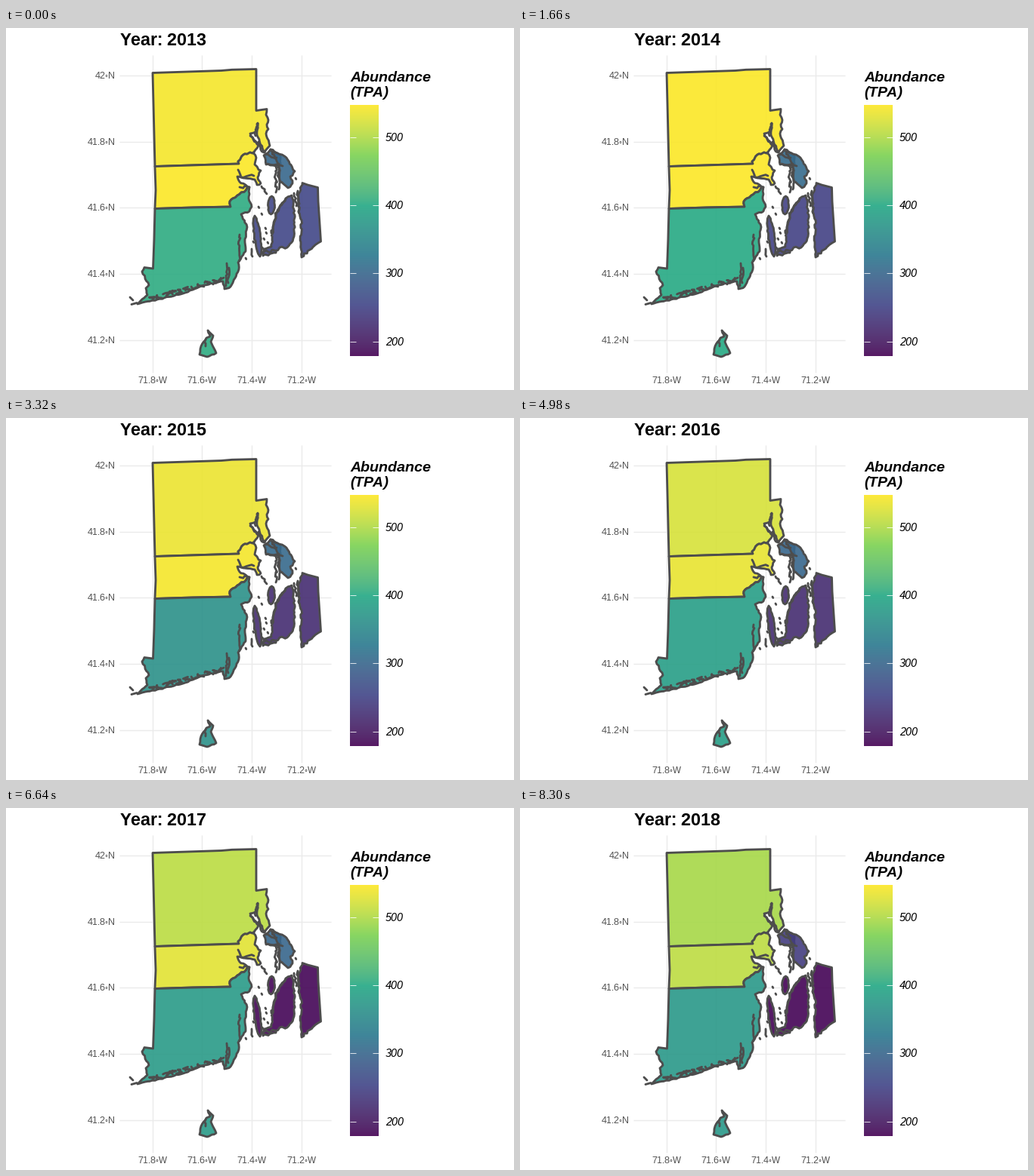
A matplotlib script for the animation above (9960 ms loop, 672 by 480 pixels).

```python
import random

import matplotlib.pyplot as plt
import numpy as np
from matplotlib.animation import FuncAnimation
from matplotlib.patches import Polygon

W, H, DPI = 672, 480, 96
PX = 72 / DPI
INK = "#4d4d4d"
ALPHA = 0.9
STROKE = 2.85 * PX
rng = random.Random(11)

plt.rcParams.update({
    "font.family": ["Liberation Sans", "DejaVu Sans"],
    "text.hinting": "default",
    "text.hinting_factor": 1,
})

# --- colour scale: six viridis stops blended in CIE Lab ---------------------
STOPS = "440154 414487 2A788E 22A884 7AD151 FDE725".split()
XYZ = np.array([[0.4124, 0.3576, 0.1805],
                [0.2126, 0.7152, 0.0722],
                [0.0193, 0.1192, 0.9505]])
WHITE = XYZ.sum(axis=1)
OPP = np.array([[0, 116, 0], [500, -500, 0], [0, 200, -200]])


def to_lab(code):
    c = np.array([int(code[i:i + 2], 16) for i in (0, 2, 4)]) / 255
    lin = np.where(c > 0.04045, ((c + 0.055) / 1.055) ** 2.4, c / 12.92)
    t = XYZ @ lin / WHITE
    return OPP @ np.where(t > 0.008856, np.cbrt(t), 7.787 * t + 16 / 116)


def to_rgb(lab):
    f = np.linalg.solve(OPP, lab)
    t = np.where(f > 0.2069, f ** 3, (f - 16 / 116) / 7.787)
    lin = np.clip(np.linalg.solve(XYZ, t * WHITE), 0, 1)
    c = np.where(lin > 0.0031308, 1.055 * lin ** (1 / 2.4) - 0.055, 12.92 * lin)
    return np.clip(c, 0, 1)


LABS = np.array([to_lab(s) for s in STOPS])


def shade(t):
    pos = np.linspace(0, 1, len(STOPS))
    return to_rgb(np.array([np.interp(t, pos, LABS[:, k]) for k in range(3)]))


# --- map geometry -----------------------------------------------------------
def rough(pts, amp=1.0, step=3.2):
    """Subdivide a line and shake the inner points like a coast."""
    out = [pts[0]]
    for (x0, y0), (x1, y1) in zip(pts, pts[1:]):
        n = max(1, round(np.hypot(x1 - x0, y1 - y0) / step))
        for i in range(1, n + 1):
            a = amp if i < n else 0
            out.append((x0 + (x1 - x0) * i / n + rng.uniform(-a, a),
                        y0 + (y1 - y0) * i / n + rng.uniform(-a, a)))
    return out


def island(x, y, rx, ry, lean):
    """A ragged ellipse whose top leans sideways."""
    a = np.linspace(0, 2 * np.pi, 13)
    top = -np.sin(a)
    return rough(list(zip(x + rx * np.cos(a) - lean * top, y + ry * top)), 0.7)


north_edge = [(197, 183.5), (308, 180)]
north_bay = rough([(308, 180), (307, 177), (314, 168), (328, 164.5)])
south_edge = [(197, 239.5), (246, 238), (297, 237)]
south_bay = rough([(297, 237), (296, 230), (306, 222), (322, 211)])

providence = (
    [(194, 59.5), (285, 56.5), (299, 55.3), (331, 54.5), (331, 109.5)]
    + rough([(345, 107.5), (344, 115), (347, 122), (345, 128), (347, 134), (344, 140),
             (349, 156), (342, 165), (332, 142), (333, 126), (330, 138), (323, 140),
             (334, 156), (328, 164.5)], 0.7)
    + north_bay[::-1] + north_edge[::-1] + [(195, 100)])

kent = (
    north_edge + north_bay
    + rough([(328, 164.5), (331, 172), (329, 181), (337, 189), (333, 198), (337, 206),
             (332, 208), (329, 201), (306, 197), (309, 204), (322, 211)])
    + south_bay[::-1] + south_edge[::-1] + [(198, 215)])

washington = (
    south_edge + south_bay
    + rough([(322, 211), (321, 226), (325, 237), (322, 243), (311, 247), (319, 264),
             (316, 284), (317, 296), (307, 311), (308, 320), (297, 343), (289, 346),
             (287, 336), (262, 341), (231, 353), (200, 360), (174, 366), (187, 354),
             (185, 345), (189, 341), (180, 323), (183, 317.5)], 0.7)
    + [(194.5, 319), (196, 280)])

block_island = rough([(267, 401), (274, 408), (271, 416), (278, 431), (266, 436),
                      (256, 433), (258, 422), (265, 411), (270, 409), (267, 401)], 0.5)

barrington = rough([(341, 169), (350, 161), (363, 168), (362, 183), (344, 181),
                    (341, 169)])
bristol = rough([(350, 161), (371, 172), (382, 190), (376, 197), (379, 206),
                 (373, 212), (362, 203), (360, 180), (350, 161)])

tiverton = (
    [(392, 205.5), (399, 208), (412.5, 211.5), (413, 230), (416.5, 283)]
    + rough([(416.5, 283), (402, 294), (391, 304), (390, 287), (391, 255), (387, 244),
             (387, 220), (392, 205.5)], 1.3))
aquidneck = rough([(378, 222), (382, 248), (380, 279), (372, 291), (362, 291),
                   (357, 298), (340, 302), (341, 293), (351, 290), (354, 258),
                   (361, 239), (370, 226), (378, 222)], 1.3)
conanicut = island(332.5, 276, 4, 27, -3.5)
prudence = island(351, 235, 4.5, 12, 0.5)

COUNTIES = [
    [providence],
    [kent],
    [washington, block_island],
    [barrington, bristol],
    [tiverton, aquidneck, conanicut, prudence],
]
# Position on the colour scale, one row per county, one column per year.
LEVELS = [
    [0.985, 0.997, 0.97, 0.935, 0.892, 0.86],
    [0.996, 0.999, 0.985, 0.965, 0.955, 0.895],
    [0.613, 0.603, 0.5, 0.56, 0.543, 0.535],
    [0.335, 0.345, 0.34, 0.33, 0.33, 0.175],
    [0.21, 0.19, 0.115, 0.112, 0.008, 0.004],
]

# Narrow inlets, each a ragged stroke between two ends.
INLETS = [
    (323, 143, 332, 152), (332, 127, 330, 143), (334, 151, 341, 165),
    (307, 188, 310, 197), (309, 197, 328, 196), (309, 211, 318, 210),
    (309, 274, 308, 309), (292, 312, 291, 342), (295, 318, 294, 338),
    (264, 413, 264, 422), (344, 168, 358, 172), (346, 180, 366, 183),
    (357, 184, 357, 218), (361, 184, 361, 214), (338, 210, 345, 220),
    (381, 219, 384, 236), (386, 216, 388, 246), (370, 226, 356, 246),
    (357, 247, 351, 272), (341, 297, 356, 295), (325, 293, 326, 303),
]
ISLETS = [(334, 237), (338, 246), (343, 265), (344, 271), (341, 279), (346, 284),
          (339, 291), (327, 283), (317, 305), (383, 199)]

strokes = [rough([(x0, y0), (x1, y1)], 1.8) for x0, y0, x1, y1 in INLETS]
strokes += [[(x, y), (x + 0.8, y + 1.5)] for x, y in ISLETS]
strokes += [[(164, 357), (168, 361)], [(166, 366.5), (173, 364.5)]]
# Salt ponds behind the southern beaches
for x in range(194, 288, 9):
    y = np.interp(x, [190, 231, 288], [359, 348, 333])
    strokes.append([(x + rng.uniform(-5, 5), y + rng.uniform(-3, 4)) for _ in range(5)])

# --- static picture ---------------------------------------------------------
fig = plt.figure(figsize=(W / DPI, H / DPI), dpi=DPI, facecolor="white")
ax = fig.add_axes([0, 0, 1, 1])
ax.axis("off")

grid = dict(color="#ebebeb", lw=1.42 * PX, zorder=1, solid_capstyle="butt")
label = dict(size=8.8, color=INK, va="baseline")
for i in range(5):
    y = 63 + 87.65 * i
    ax.plot([150, 430], [y, y], **grid)
    ax.text(145, y + 4, f"{42 - 0.2 * i:.3g}\u25e6N", ha="right", **label)
for i in range(4):
    x = 193.7 + 65.6 * i
    ax.plot([x, x], [36, 457], **grid)
    ax.text(x, 471, f"{71.8 - 0.2 * i:.3g}\u25e6W", ha="center", **label)

shapes = []
for parts in COUNTIES:
    group = [Polygon(p, closed=True, ec=INK, lw=STROKE, joinstyle="round", zorder=3)
             for p in parts]
    for patch in group:
        ax.add_patch(patch)
    shapes.append(group)
for line in strokes:
    ax.plot(*zip(*line), color=INK, lw=STROKE, solid_capstyle="round",
            solid_joinstyle="round", zorder=4)

# Colour bar
ramp = np.array([[shade(t)] for t in np.linspace(1, 0, 333)])
ax.imshow(ramp * ALPHA + 1 - ALPHA, extent=(455, 492.5, 435.5, 103), aspect="auto",
          interpolation="bilinear", zorder=2)
for value in (200, 300, 400, 500):
    y = 145 + (500 - value) * 0.902
    for x in (455, 485):
        ax.plot([x, x + 7.5], [y, y], color="white", lw=0.8 * PX, zorder=3,
                solid_capstyle="butt")
    ax.text(502, y + 5, str(value), size=11, style="italic", va="baseline")
for y, word in ((71, "Abundance"), (91, "(TPA)")):
    ax.text(455, y, word, size=14, style="italic", weight="bold", va="baseline")

title = ax.text(151, 23, "", size=17, weight="bold", va="baseline")
ax.set_xlim(0, W)
ax.set_ylim(H, 0)


def draw(i):
    title.set_text(f"Year: {2013 + i}")
    for group, levels in zip(shapes, LEVELS):
        for patch in group:
            patch.set_facecolor((*shade(levels[i]), ALPHA))
    return [title, *(p for g in shapes for p in g)]


anim = FuncAnimation(fig, draw, frames=6, interval=1660, repeat=True, repeat_delay=0)
plt.show()
```
